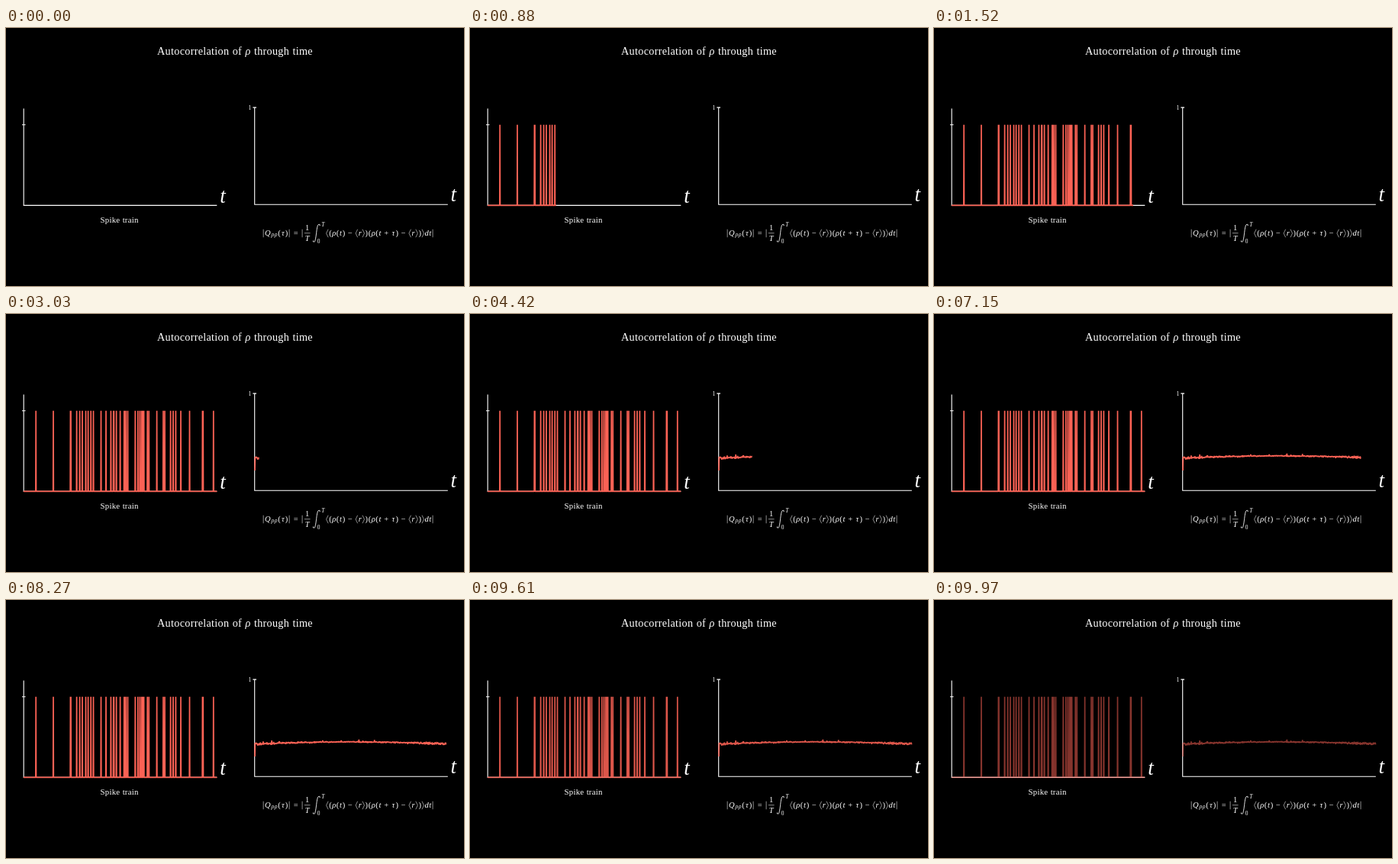
An HTML page that plays this animation: 600x338 px, repeating every 10 s.

```html
<!DOCTYPE html>
<html lang="en">
<head>
<meta charset="utf-8">
<title>Autocorrelation of ρ through time</title>
<style>
  html, body { margin: 0; width: 100%; height: 100%; overflow: hidden; background: #000; }
  svg { display: block; width: 100vw; height: 100vh; }
  text { fill: #fff; font-family: "Liberation Serif", serif; }
  i, .it { font-style: italic; }
  .words { letter-spacing: .021em; word-spacing: .035em; text-anchor: middle; }
  .glyph { text-anchor: middle; }
  .axis { fill: none; stroke: #fff; stroke-width: 1.1; }
  .thin { fill: none; stroke: #fff; stroke-width: .55; }
  .curve { fill: none; stroke: #fc6255; stroke-width: 1.7; stroke-linejoin: bevel; }
</style>
</head>
<body>
<svg viewBox="0 0 600 338">
  <defs>
    <clipPath id="clipTrain"><rect id="trainWipe" x="20" y="90" width="0" height="160"/></clipPath>
    <clipPath id="clipCorr"><rect id="corrWipe" x="323" y="90" width="0" height="160"/></clipPath>
  </defs>

  <text class="words" x="300" y="34.6" font-size="14.2">Autocorrelation of <tspan class="it">ρ</tspan> through time</text>
  <text class="words" x="148.6" y="255.4" font-size="10.8">Spike train</text>

  <path class="axis" d="M23.2 105.6V232.4H276.3M21 126.7H25.6"/>
  <path class="axis" d="M325.7 103.6V231.2H578.8M323.4 104.1H328"/>
  <text class="glyph" x="319.4" y="106.9" font-size="7.6">1</text>
  <text class="it" x="280.3" y="228.6" font-size="27">t</text>
  <text class="it" x="582.4" y="227.4" font-size="27">t</text>

  <g id="formula">
    <path class="thin" d="M390.8 268.7H398.6"/>
    <path class="thin" style="stroke-width:.85" d="M402.2 279.4q.9 1.6 2.1.4q1.2-1.4 2.3-11q1-9.8 2.5-11.2q1.3-1 2.2.5"/>
    <circle cx="402.5" cy="279.2" r=".65" fill="#fff"/>
    <circle cx="411.1" cy="258.2" r=".65" fill="#fff"/>
  </g>

  <g id="curves">
    <path id="train" class="curve" clip-path="url(#clipTrain)"/>
    <path id="corr" class="curve" clip-path="url(#clipCorr)"/>
  </g>
</svg>
<script>
const $ = id => document.getElementById(id);

function add(tag, attrs, text = '') {
  const el = document.createElementNS('http://www.w3.org/2000/svg', tag);
  for (const k in attrs) el.setAttribute(k, attrs[k]);
  el.textContent = text;
  $('formula').append(el);
}

// Math typesetting: advance of each symbol in em, operators with their spacing
const EM = { '(': .389, ')': .389, '⟨': .389, '⟩': .389, '|': .278, 'ρ': .517, 'τ': .517,
  't': .361, 'r': .451, 'd': .52, 'Q': .791, 'T': .65, '0': .5, '1': .5,
  '−': 1.222, '+': 1.222, '=': 1.334 };

function math(x, y, size, symbols) {
  for (const s of symbols) {
    const w = EM[s] * size, cx = x + w / 2, top = y - .75 * size, h = size;
    if (s === '|') {
      add('path', { class: 'thin', d: `M${cx} ${top}v${h}` });
    } else if (s === '⟨' || s === '⟩') {
      const dx = (s === '⟨' ? -1 : 1) * .12 * size;
      add('path', { class: 'thin', d: `M${cx - dx} ${top}l${2 * dx} ${h / 2}l${-2 * dx} ${h / 2}` });
    } else {
      const italic = /[a-zA-Zρτ]/.test(s) ? ' it' : '';
      add('text', { class: 'glyph' + italic, x: cx, y, 'font-size': size }, s);
    }
    x += w;
  }
}

const SIZE = 10.54, BASE = 271.6;
math(335.7, BASE, SIZE, '|Q');
math(347.4, BASE + 1.7, 7.9, 'ρρ');
math(356, BASE, SIZE, '(τ)|=|');
math(392.1, 264.8, SIZE, '1');
math(391.2, 279, SIZE, 'T');
math(412.8, 260.4, 7.4, 'T');
math(407.8, 282, 7.4, '0');
math(418.8, BASE, SIZE, '⟨(ρ(t)−⟨r⟩)(ρ(t+τ)−⟨r⟩)⟩dt|');

// Spike train
const spikes = [39.2, 62, 84.4, 85, 92.6, 96.6, 100, 104.5, 107.6, 111.2, 114.5, 124.5,
  131, 137.4, 140.8, 141.4, 144.6, 149.6, 154.8, 155.3, 157.2, 159.5, 169.3, 172.8, 175.4,
  177.6, 179.2, 180.6, 185.2, 187.2, 197.6, 206, 208, 215.6, 219, 222.4, 229, 240.5,
  257.4, 258.2, 271.8];
$('train').setAttribute('d', 'M22.9 232.4' +
  spikes.map(x => `L${x - .3} 232.4L${x} 126.8L${x + .3} 232.4`).join('') + 'L276.3 232.4');

// Autocorrelation: a shallow arch with noise that calms in the middle
let seed = 11;
const rand = () => (seed = seed * 16807 % 2147483647) / 2147483647;
const X0 = 326, SPAN = 253, STEPS = 720;
let d = `M${X0} 205`;
for (let i = 1; i <= STEPS; i++) {
  const u = i / STEPS, arch = Math.sin(Math.PI * u);
  let noise = (rand() + rand() + rand() - 1.5) * (2.1 - 1.2 * arch);
  if (rand() < .018) noise -= 1.2 + 1.6 * rand();
  d += `L${(X0 + SPAN * u).toFixed(2)} ${(188.6 - 2.7 * arch + noise).toFixed(2)}`;
}
$('corr').setAttribute('d', d);

// Normalised sigmoid easing
const sigmoid = v => 1 / (1 + Math.exp(-v));
function ease(now, start, length) {
  const t = Math.min(1, Math.max(0, (now - start) / length)), edge = sigmoid(-5);
  return (sigmoid(10 * (t - .5)) - edge) / (1 - 2 * edge);
}

function wipe(id, p, width) {
  $(id).setAttribute('width', p > 1e-6 ? 3 + p * width : 0);
}

function draw() {
  const now = performance.now() % 10000;
  wipe('trainWipe', ease(now, 0, 2000), 254);
  wipe('corrWipe', ease(now, 2000, 7000), 254);
  $('curves').setAttribute('opacity', 1 - ease(now, 9000, 2000));
  requestAnimationFrame(draw);
}
draw();
</script>
</body>
</html>
```
